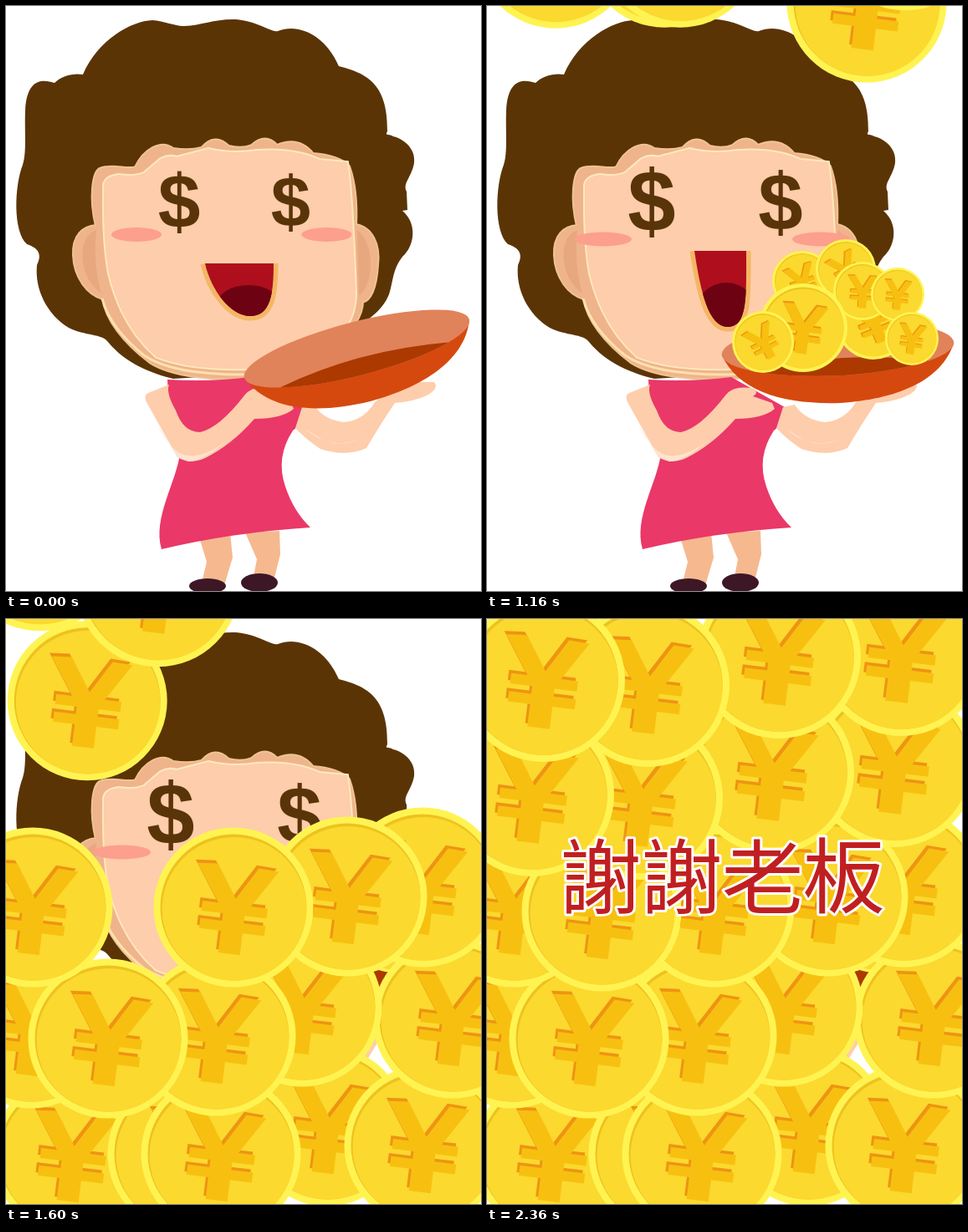
An HTML page with a canvas for the animation above (2.96 s loop, 568 by 700 pixels).

```html
<!DOCTYPE html>
<html lang="zh-Hant">
<head>
<meta charset="utf-8">
<style>
html, body { margin: 0; width: 100%; height: 100%; overflow: hidden; background: #fff; }
canvas { display: block; }
</style>
</head>
<body>
<canvas id="stage" width="568" height="700"></canvas>
<script>
const ctx = document.getElementById('stage').getContext('2d');
const LOOP = 2960, STEP = 40, LAST = 2360;
const SKIN = '#fecdab', BROWN = '#5b3406';

const clamp = (v) => Math.max(0, Math.min(1, v));
const mix = (a, b, p) => a + (b - a) * p;

function shape(d, fill, stroke, width) {
  const path = new Path2D(d);
  if (stroke) {
    ctx.strokeStyle = stroke;
    ctx.lineWidth = width;
    ctx.stroke(path);
  }
  if (fill) {
    ctx.fillStyle = fill;
    ctx.fill(path);
  }
}

function oval(x, y, rx, ry, fill) {
  ctx.fillStyle = fill;
  ctx.beginPath();
  ctx.ellipse(x, y, rx, ry, 0, 0, Math.PI * 2);
  ctx.fill();
}

const HAIR = 'M92 82C110 40 150 18 175 17C190 18 205 25 213 24C235 23 250 15 275 16' +
  'C300 18 318 32 325 30C350 20 382 35 398 72C428 80 457 90 456 150C453 156 456 152 463 156' +
  'C478 160 490 172 488 188C485 205 474 212 479 222L480 244L474 245C492 260 489 287 474 300' +
  'C462 315 463 330 458 345C450 365 435 372 422 385L300 440L200 446C175 440 143 428 122 402' +
  'C115 392 95 395 75 385C50 370 34 340 37 310C43 298 40 290 25 285C8 270 10 215 20 190' +
  'C25 175 22 150 23 125C25 85 45 88 58 92C66 84 80 80 92 82Z';

const HEAD = 'M108 263C100 230 104 200 112 195C128 189 145 197 155 193C165 172 185 160 200 171' +
  'Q220 174 234 170Q250 152 266 168Q282 172 294 167Q310 152 324 167Q350 156 367 177Q397 179 410 192' +
  'Q420 220 418 262C437 265 447 285 444 310C442 340 434 352 426 354Q426 378 390 410' +
  'C365 436 330 445 290 445C250 447 200 444 172 426C140 402 120 375 116 350C98 345 82 325 81 298' +
  'C80 275 92 264 108 263Z';

const FACE = 'M117 215Q118 204 135 202Q152 205 165 200L185 183Q195 178 204 181L242 171Q270 178 300 173' +
  'Q345 170 375 184L408 187Q414 225 418 345Q418 380 385 410Q365 430 290 434Q220 436 180 420' +
  'C140 385 128 340 123 320C116 280 117 240 117 215Z';

function girlBase() {
  shape(HAIR, BROWN);
  shape(HEAD, '#efb48b', '#eec493', 4);
  shape(FACE, SKIN, '#fee9bc', 4);
  shape('M108 268C84 276 86 325 114 344Q104 310 108 268Z', '#e8a87f');
  shape('M420 268C442 284 440 335 422 346Z', '#e8a87f');
  shape('M115 350Q124 385 165 418Q200 442 290 441Q350 438 383 413', null, '#fee0ae', 3);

  shape('M231 636L240 665L234 690H262L271 660L268 630Z', '#f6b98f');
  shape('M286 630L300 662L295 688H320L328 656L327 628Z', '#f6b98f');
  oval(241, 694, 22, 9, '#3d1726');
  oval(303, 690, 22, 11, '#3d1726');

  shape('M193 447Q245 450 292 444L356 480Q354 500 343 508Q322 540 334 575Q344 605 364 624' +
    'Q270 630 186 650C175 612 204 570 208 535L195 490Z', '#ea3868');
  shape('M195 453L170 463Q164 466 168 474L205 540Q220 549 238 541Q270 525 297 494Q330 494 344 482' +
    'L341 475L318 467Q325 463 320 458Q295 453 285 466Q255 505 232 510Q212 510 203 484' +
    'Q191 463 195 453Z', SKIN);
  shape('M181 500Q198 536 218 538Q240 540 268 517Q235 546 218 545L205 540Z', '#fee3cf');
  shape('M354 480L368 477Q379 495 404 498Q428 496 441 474L470 450H512Q518 457 505 465Q490 473 465 475' +
    'Q448 500 431 529Q406 540 376 530Q358 518 346 505Z', SKIN);
  shape('M358 506Q392 535 426 516Q403 528 380 520Z', '#fee9dd');
}

function dollar(x, y, size) {
  ctx.font = `bold ${size}px "Liberation Sans", Arial, sans-serif`;
  ctx.textAlign = 'center';
  ctx.textBaseline = 'alphabetic';
  const m = ctx.measureText('$');
  ctx.fillStyle = '#5a3409';
  ctx.fillText('$', x, y + (m.actualBoundingBoxAscent - m.actualBoundingBoxDescent) / 2);
}

function mouth(p, lift) {
  const l = mix(238, 248, p), r = mix(320, 310, p), c = mix(292, 288, p);
  const top = mix(308, 293, lift), bottom = mix(371, 384, lift);
  const h = bottom - top;
  const curve = `M${l} ${top}C${l + 7} ${top + h * .5} ${c - 24} ${bottom} ${c} ${bottom}` +
    `C${c + 24} ${bottom} ${r} ${top + h * .6} ${r} ${top}`;
  ctx.save();
  ctx.beginPath();
  ctx.rect(200, top, 160, 120);
  ctx.clip();
  shape(curve, '#af0e1d', '#f5b664', 11);
  ctx.clip(new Path2D(curve));
  oval(c - 2, bottom - 13, 38, mix(24, 40, lift), '#6d0212');
  ctx.restore();
}

function face(t) {
  const p = Math.pow(clamp(t / 700), 1.3);
  const cheekY = mix(273.5, 279, p), rx = mix(30, 34.5, p);
  oval(mix(156, 138.5, p), cheekY, rx, 8.5, '#fc9f8c');
  oval(mix(383.5, 399.5, p), cheekY, rx, 8.5, '#fc9f8c');
  dollar(mix(207, 197, p), 234, mix(91, 103, p));
  dollar(mix(340.5, 351, p), 235, mix(85, 96, p));
  mouth(p, p * p);
}

function bowl(t) {
  const p = clamp(t / 580);
  ctx.save();
  ctx.translate(419.5, 410);
  ctx.rotate(mix(-14.5, -3, p) * Math.PI / 180);
  shape('M-139 0C-122 46 -65 64 0 65C65 64 122 46 139 0Z', '#d5490f');
  oval(0, 0, 139, 32, '#e0835a');
  ctx.beginPath();
  ctx.ellipse(0, 0, 139, 32, 0, 0, Math.PI * 2);
  ctx.clip();
  shape('M-100 22Q0 2 107 20L107 40H-100Z', '#ab3900');
  ctx.restore();
}

const YEN = new Path2D('M-50 -49L-26 -51L0 -12L23 -51L47 -50L19 -5H39V7H13V16H39V28H13V54H-13V28' +
  'H-39V16H-13V7H-39V-5H-20Z');

function coin(x, y, r, tilt = 7) {
  if (y < -r) return;
  ctx.save();
  ctx.translate(x, y);
  ctx.scale(r / 95, r / 95);
  oval(0, 0, 95, 95, '#fff352');
  oval(0, 0, 87, 87, '#eec21e');
  oval(1, 2, 86, 85.5, '#fbd92f');
  ctx.rotate(tilt * Math.PI / 180);
  ctx.translate(-1.5, -2);
  ctx.fillStyle = '#ee9413';
  ctx.fill(YEN);
  ctx.translate(3, 3.5);
  ctx.fillStyle = '#f7c010';
  ctx.fill(YEN);
  ctx.restore();
}

// Radius, tilt, then the points passed as [time, x, y].
const SMALL = [
  [45, -22, [185, 455, -50], [320, 456, 109], [720, 458, 335], [840, 462, 378]],
  [36, -18, [260, 372, -40], [320, 373, -1], [720, 376, 255], [840, 377, 329]],
  [36, -28, [440, 410, -40], [720, 418, 201], [880, 429, 315]],
  [35, 3, [360, 440, -40], [680, 452, 342], [1000, 449, 341]],
  [32, 6, [400, 480, -40], [720, 491, 299], [800, 491, 345]],
  [53, 8, [80, 368, -60], [320, 373, 231], [440, 378, 385]],
  [32, 8, [340, 500, -40], [640, 508, 398]],
  [37, -28, [300, 354, -55], [320, 352, -27], [640, 330, 402]]
];

function along(points, t) {
  let from = points[0];
  for (const to of points) {
    if (t < to[0]) {
      const p = clamp((t - from[0]) / (to[0] - from[0]));
      return [mix(from[1], to[1], p), mix(from[2], to[2], p)];
    }
    from = to;
  }
  return [from[1], from[2]];
}

// Resting x and y, landing time, x on entering; back to front.
const BIG = [
  [384, 607, 1395, 465], [500, 630, 1437, 500], [79, 641, 1433, 82], [217, 640, 1433, 212], [257, 640, 1433, 230],
  [534, 478, 1470, 475], [354, 464, 1490, 357], [251, 499, 1477, 233], [30, 490, 1507, 69], [122, 502, 1496, 103],
  [498, 321, 1540, 490], [408, 332, 1555, 400], [272, 345, 1570, 265], [32, 345, 1590, 40], [137, 350, 1697, 66],
  [487, 175, 1740, 480], [341, 183, 1725, 350], [184, 214, 1698, 181], [54, 210, 1713, 39],
  [495, 42, 1800, 490], [349, 45, 1815, 345], [192, 79, 1830, 185], [67, 73, 1845, 60]
];
const FALL = 2.6;

function bigCoin([x, y, land, x0], t) {
  const r = y < 230 ? 98 : 95.5;
  const left = Math.max(0, land - t) * FALL;
  coin(mix(x, x0, left / (y + 100)), y - left, r);
}

function thanks(t) {
  ctx.save();
  ctx.globalAlpha = clamp((t - 1700) / (LAST - 1700));
  ctx.font = '400 98px "Noto Sans CJK TC", "Noto Sans CJK SC", "Noto Sans CJK JP", sans-serif';
  ctx.textAlign = 'center';
  ctx.textBaseline = 'alphabetic';
  ctx.lineJoin = 'round';
  ctx.lineWidth = 6;
  ctx.strokeStyle = '#fff';
  ctx.fillStyle = '#c01f22';
  [...'謝謝老板'].forEach((c, i) => {
    const m = ctx.measureText(c);
    const x = 135.5 + i * 97;
    const y = 307 + (m.actualBoundingBoxAscent - m.actualBoundingBoxDescent) / 2;
    ctx.strokeText(c, x, y);
    ctx.fillText(c, x, y);
  });
  ctx.restore();
}

function draw(t) {
  ctx.fillStyle = '#fff';
  ctx.fillRect(0, 0, 568, 700);
  girlBase();
  face(t);
  bowl(t);
  for (const [r, tilt, ...points] of SMALL) coin(...along(points, t), r, tilt);
  for (const c of BIG) bigCoin(c, t);
  if (t > 1700) thanks(t);
}

const start = performance.now();
function tick() {
  const t = (performance.now() - start) % LOOP;
  draw(Math.min(LAST, Math.floor(t / STEP) * STEP));
  requestAnimationFrame(tick);
}
tick();
</script>
</body>
</html>
```
